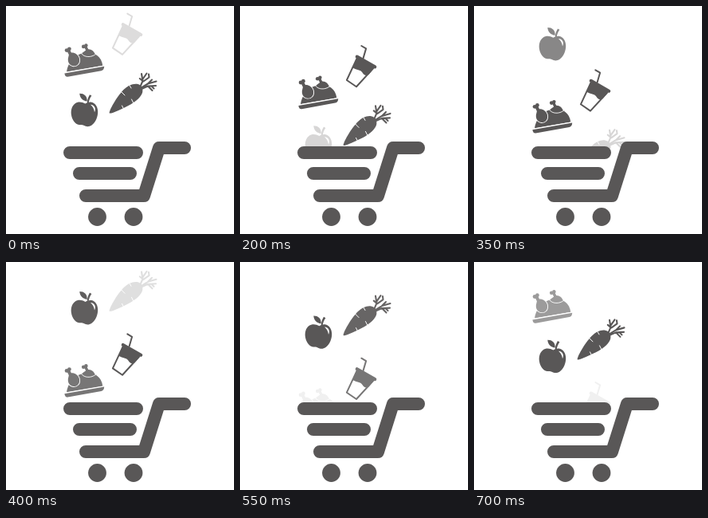
Recreate the animation shown at these times as an HTML page with a canvas. Size 286 by 286 pixels, loop 750 ms.

```html
<!DOCTYPE html>
<html lang="en">
<head>
<meta charset="utf-8">
<title>Groceries falling into a cart</title>
<style>
  html, body { margin: 0; width: 100%; height: 100%; overflow: hidden; background: #fff; }
  canvas { display: block; width: 286px; height: 286px; }
</style>
</head>
<body>
<canvas id="stage"></canvas>
<script>
const SIZE = 286, LOOP = 750, STEP = 50;
const CYCLE = 760, SPEED = 0.202, FADE = 207;
const INK = [89, 87, 87];

const canvas = document.getElementById('stage');
const ctx = canvas.getContext('2d');
const scale = window.devicePixelRatio || 1;
canvas.width = canvas.height = Math.round(SIZE * scale);

const fill = (d, color) => {
  ctx.fillStyle = color;
  ctx.fill(new Path2D(d));
};
const line = (d, color, width) => {
  ctx.strokeStyle = color;
  ctx.lineWidth = width;
  ctx.stroke(new Path2D(d));
};
const disc = (x, y, r, color) => {
  ctx.fillStyle = color;
  ctx.beginPath();
  ctx.arc(x, y, r, 0, Math.PI * 2);
  ctx.fill();
};
const mix = a => `rgb(${INK.map(c => Math.round(255 + (c - 255) * a)).join(',')})`;

function apple(ink) {
  fill('M99.5 122.6C95 120 90 119.8 86.5 122.5C82.5 125.5 81 131 82 137C83 143 87 148.3 91.5 149C94 149.3 95.5 148.8 97.5 149.8C100.5 151.5 104 152 107.5 149.5C112.5 146 115.5 138.5 115.2 132C115 126.5 112 121.8 107.5 120.8C104.5 120.2 101.8 121 99.5 122.6Z', ink);
  fill('M92.3 109.8C98 109.7 102 113 101.7 119.6C96.3 119 92.6 115.5 92.3 109.8Z', ink);
  fill('M101.7 121.5C102 117 103.4 114 105 111.2L107.4 112.6C105.4 115.4 104.2 118 103.7 121.5Z', ink);
  fill('M106 123.8C111.2 124 113.4 129 111 133.3C110.6 129.2 109 126.4 106 123.8Z', '#fff');
}

function carrot(ink) {
  line('M168 102L171.5 94L170 85M171.5 94L167.8 91M171.3 92L176.5 84.5M172.5 94.5L179.5 89.5L179 85.5', ink, 2.1);
  line('M169 103L178 97.5L183 92.5M178 97.5L188.5 94.5M170 104L178 100.5L188 100M178 100.5L183.5 106M182.5 100.5L185.5 103.5', ink, 2.1);
  fill('M129.7 134.4C129.2 131.5 138.5 114 148 104.5C153 99.5 159 97 164.5 97.8C170 99 172.5 103.5 171 109C168.5 116 160 122 149 127.2C140 131.5 132 135.5 129.7 134.4Z', ink);
  line('M144.5 107.5L149 112M154.5 98.8L157 103M160 122L157.5 117M147.5 129L145.5 125', '#fff', 1);
}

function roast(ink) {
  fill('M76 82.5C77.5 72.5 83 64.8 91 61C102 56 119 57.5 121.3 74.8Z', ink);
  // far leg
  fill('M101.5 54.5C106 53 111 56.5 112 61.5C106 65.5 98 64.5 95.5 59Z', ink);
  line('M95 60C98 64.5 107 65 112.5 60.5', '#fff', 0.9);
  line('M99.5 50.5L102.5 56.5', ink, 3.4);
  disc(97.2, 50.9, 2.3, ink);
  disc(100.4, 49.4, 2.2, ink);
  // near leg
  const drumstick = 'M79.3 59.5C83 57 90.5 59.5 92 66C93 72 89.5 75.5 84.5 75.3C78.5 74.5 76.7 68.5 78.4 63.5Z';
  line(drumstick, '#fff', 1.8);
  fill(drumstick, ink);
  line('M78.3 55.5L81.2 61.5', ink, 4);
  disc(76.1, 55.6, 2.4, ink);
  disc(79.4, 53.8, 2.4, ink);
  // tray
  line('M73.3 83.9L123.2 75.2', '#fff', 1.2);
  fill('M73.4 84.5L123.2 75.8C123.2 78.8 122 80.6 119.5 81.2L77.5 88.8C75.2 89.2 73.7 87.4 73.4 84.5Z', ink);
}

function drink(ink) {
  line('M152.3 9.6L158.1 13L154.6 25', ink, 2);
  line('M146.8 23.2L169.2 36', ink, 4.2);
  line('M146.3 26L133.9 52.6L146 60.9L167 38', ink, 2);
  fill('M146.3 24L168.5 37L161.5 45.5C158 47.5 155.5 46.5 153.5 43C151 39 146.5 40 141.5 37Z', ink);
}

// birth: when the item appears in the loop; life: how long until it has faded out
const items = [
  { draw: apple, birth: 202, life: 808 },
  { draw: carrot, birth: 360, life: 800 },
  { draw: roast, birth: 577, life: 752 },
  { draw: drink, birth: -43, life: 762 }
];

function drawItem({ draw, birth, life }, t) {
  const restAge = birth < 0 ? -birth : CYCLE - birth;
  for (const age of [t - birth, t - birth + CYCLE]) {
    if (age <= 0 || age >= life) continue;
    ctx.save();
    ctx.translate(0, SPEED * (age - restAge));
    draw(mix(Math.min(1, age / FADE, (life - age) / FADE)));
    ctx.restore();
  }
}

function drawCart() {
  const ink = mix(1);
  line('M80 184H164M92 210H156M100 238H173L192 178H224', ink, 16);
  disc(114.5, 264.5, 11.4, ink);
  disc(160, 264.5, 11.4, ink);
}

function render(now) {
  const t = Math.floor((now % LOOP) / STEP) * STEP;
  ctx.setTransform(scale, 0, 0, scale, 0, 0);
  ctx.fillStyle = '#fff';
  ctx.fillRect(0, 0, SIZE, SIZE);
  ctx.lineCap = ctx.lineJoin = 'round';

  // items vanish behind the top bar
  ctx.save();
  ctx.beginPath();
  ctx.rect(0, 0, SIZE, 179);
  ctx.clip();
  items.forEach(item => drawItem(item, t));
  ctx.restore();
  drawCart();
}

let start;
function tick(now) {
  start ??= now;
  render(now - start);
  requestAnimationFrame(tick);
}
render(0);
requestAnimationFrame(tick);
</script>
</body>
</html>
```
